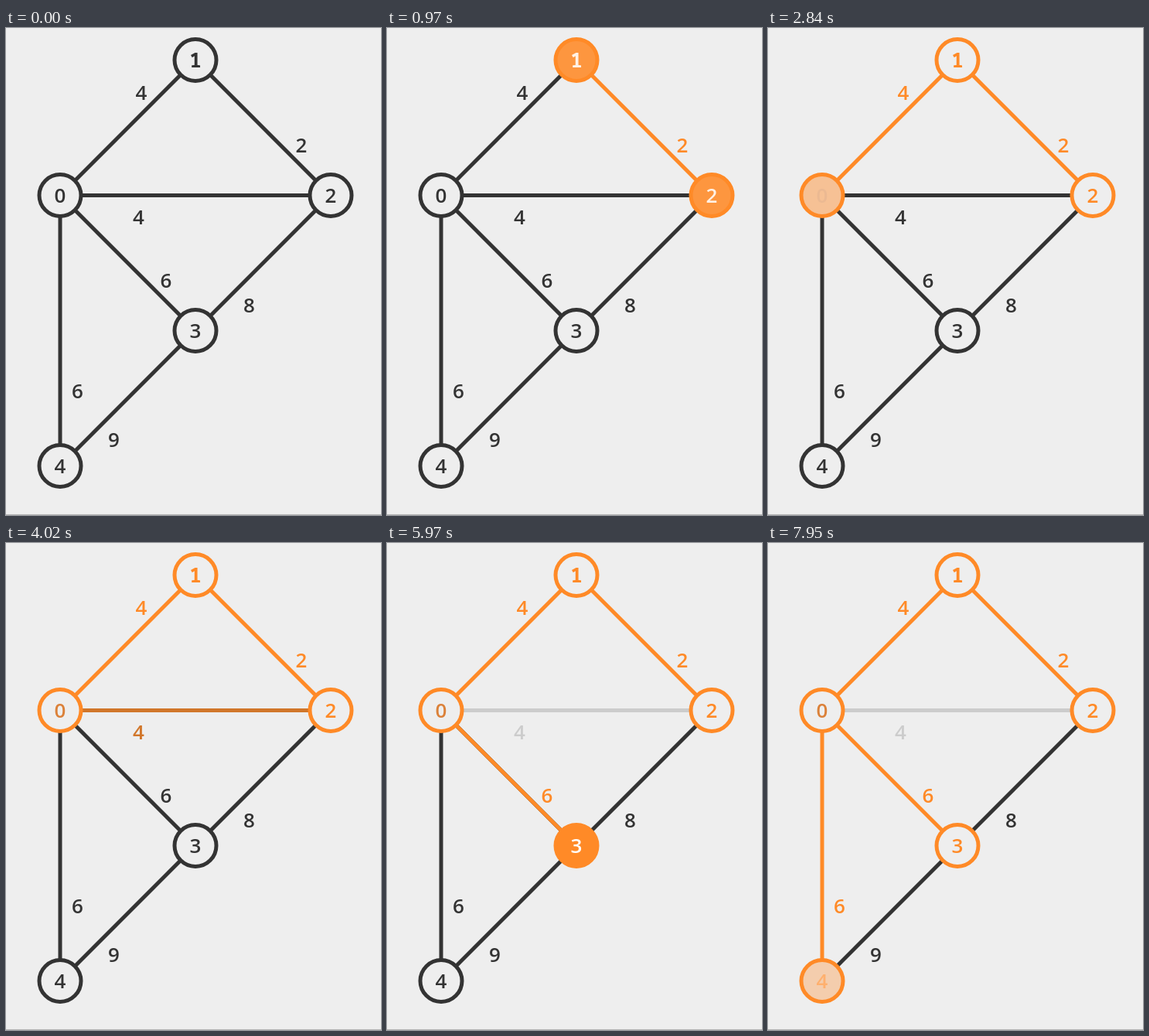
Animation of 485 by 630 pixels, one loop 8 s. Source, as an HTML page with a canvas:

```html
<!DOCTYPE html>
<html lang="en">
<head>
<meta charset="utf-8">
<title>Minimum spanning tree</title>
<style>
  html, body { margin: 0; width: 100%; height: 100%; overflow: hidden; background: #eee; }
  canvas { display: block; }
</style>
</head>
<body>
<canvas id="stage" width="485" height="630"></canvas>
<script>
const ctx = document.getElementById('stage').getContext('2d');
const LOOP = 8000, RADIUS = 27, STROKE = 5;

const BACK = [238, 238, 238], DARK = [51, 51, 51], ORANGE = [255, 138, 39];
const WHITE = [255, 255, 255], GREY = [204, 204, 204], DULL_ORANGE = [219, 129, 57];

// lit / faded: [start, duration] of the highlight and of its fill fading away
const nodes = [
  { x: 70, y: 216.5, lit: [1965, 565], faded: [2530, 600], ink: DULL_ORANGE },
  { x: 245, y: 41.5, lit: [330, 500], faded: [770, 640] },
  { x: 420, y: 216.5, lit: [330, 500], faded: [770, 640] },
  { x: 245, y: 391.5, lit: [5437, 540], faded: [6030, 440] },
  { x: 70, y: 566.5, lit: [7065, 500], faded: [7600, 620] }
];

// grow: the highlight runs along the edge; blend: the whole edge changes colour
const edges = [
  { from: 2, to: 3, weight: 8, at: [314.5, 358.5] },
  { from: 3, to: 4, weight: 9, at: [139.5, 533] },
  { from: 0, to: 2, weight: 4, at: [171.5, 244.5], blend: [3590, 700], rejected: [4340, 380] },
  { from: 1, to: 2, weight: 2, at: [382, 152], grow: [330, 500] },
  { from: 1, to: 0, weight: 4, at: [175, 83.5], grow: [1965, 565] },
  { from: 0, to: 3, weight: 6, at: [207, 327], grow: [5437, 540] },
  { from: 0, to: 4, weight: 6, at: [92.5, 470], grow: [7065, 500] }
];

// Spans in which the picture stands still
const holds = [[0, 500], [970, 1100], [2080, 2350], [5520, 5660]];

function progress(time, span) {
  if (!span) return 0;
  const u = Math.min(1, Math.max(0, (time - span[0]) / span[1]));
  return u < 0.5 ? 4 * u ** 3 : 1 - 4 * (1 - u) ** 3;
}

const mix = (a, b, k) => a.map((v, i) => v + (b[i] - v) * k);
const css = color => `rgb(${color.map(Math.round).join(',')})`;

function drawText(text, x, y, color) {
  // The monospaced 1 has a foot
  const family = text === '1' ? '"Noto Sans Mono"' : '"Open Sans", "Noto Sans"';
  ctx.font = `600 26px ${family}, sans-serif`;
  ctx.fillStyle = css(color);
  ctx.fillText(text, x, y + 9.3);
}

function drawLine(x1, y1, x2, y2, color) {
  ctx.strokeStyle = css(color);
  ctx.beginPath();
  ctx.moveTo(x1, y1);
  ctx.lineTo(x2, y2);
  ctx.stroke();
}

function drawEdge(edge, time) {
  const a = nodes[edge.from], b = nodes[edge.to];
  const dx = b.x - a.x, dy = b.y - a.y, trim = RADIUS / Math.hypot(dx, dy);
  const pointX = k => a.x + dx * (trim + (1 - 2 * trim) * k);
  const pointY = k => a.y + dy * (trim + (1 - 2 * trim) * k);
  const grown = progress(time, edge.grow);
  const color = mix(mix(DARK, ORANGE, progress(time, edge.blend)), GREY, progress(time, edge.rejected));

  if (grown < 1) drawLine(pointX(0), pointY(0), pointX(1), pointY(1), color);
  if (grown > 0) drawLine(pointX(0), pointY(0), pointX(grown), pointY(grown), ORANGE);
  drawText(String(edge.weight), ...edge.at, mix(color, ORANGE, grown));
}

function drawNode(node, label, time) {
  const lit = progress(time, node.lit), faded = progress(time, node.faded);
  ctx.beginPath();
  ctx.arc(node.x, node.y, RADIUS, 0, 2 * Math.PI);
  ctx.fillStyle = css(mix(mix(BACK, ORANGE, lit), BACK, faded));
  ctx.fill();
  ctx.strokeStyle = css(mix(DARK, ORANGE, lit));
  ctx.stroke();
  drawText(String(label), node.x, node.y, mix(mix(DARK, WHITE, lit), node.ink || ORANGE, faded));
}

function draw() {
  let time = performance.now() % LOOP;
  const hold = holds.find(([start, end]) => time >= start && time < end);
  if (hold) time = hold[0];

  ctx.fillStyle = css(BACK);
  ctx.fillRect(0, 0, 485, 630);
  ctx.fillStyle = '#b5b5b5';
  ctx.fillRect(0, 629, 485, 1);
  ctx.lineWidth = STROKE;
  ctx.textAlign = 'center';
  edges.forEach(edge => drawEdge(edge, time));
  nodes.forEach((node, i) => drawNode(node, i, time));
  requestAnimationFrame(draw);
}
draw();
</script>
</body>
</html>
```
